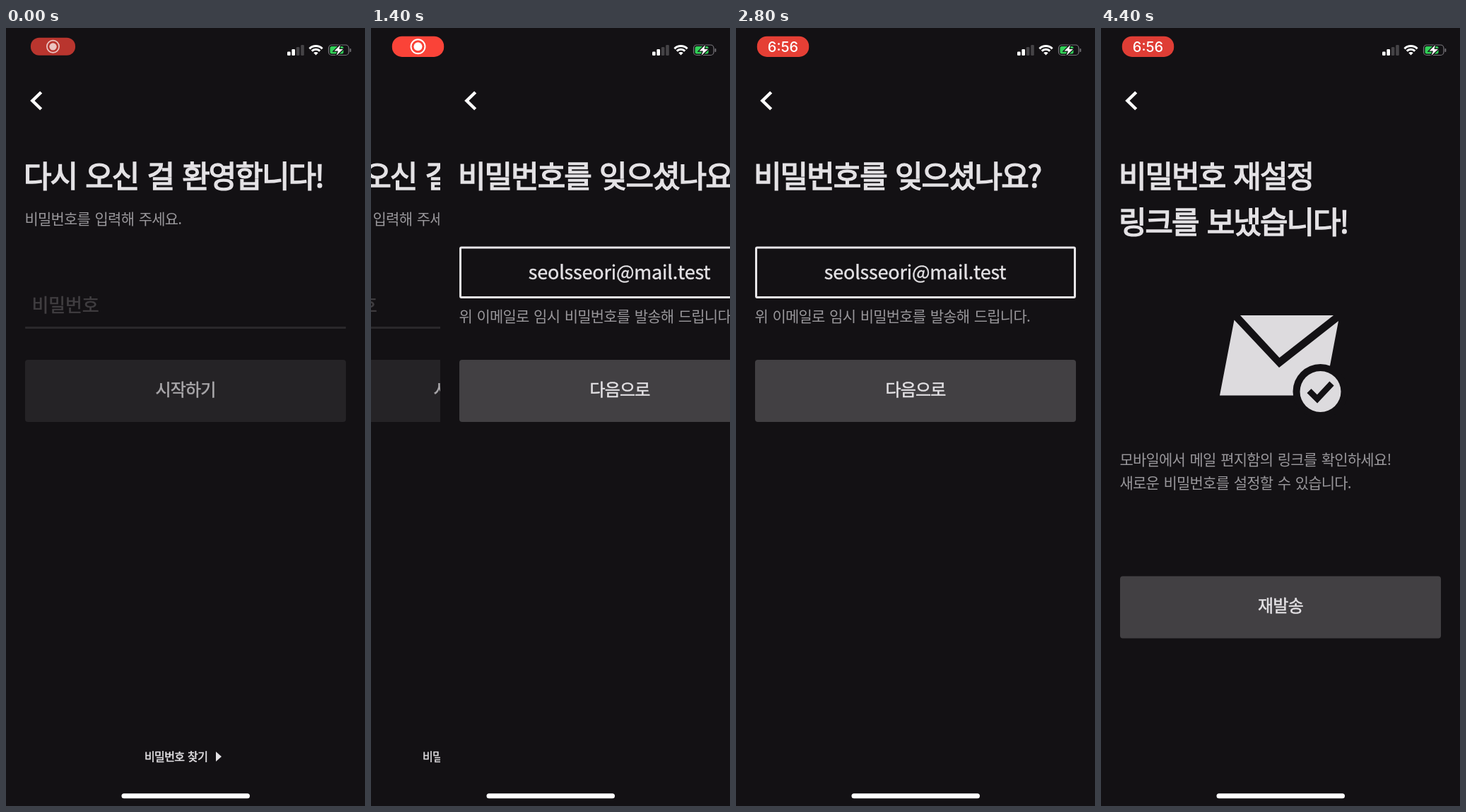
Animation, 508 px wide and 1102 px high, one loop 4.5 s. Source, as an HTML page with a canvas:

```html
<!DOCTYPE html>
<html lang="ko">
<head>
<meta charset="utf-8">
<title>비밀번호 찾기</title>
<style>
  html, body { margin: 0; width: 100%; height: 100%; overflow: hidden; background: #131114; }
  canvas { display: block; width: 508px; height: 1102px; }
</style>
</head>
<body>
<canvas id="stage"></canvas>
<script>
const W = 508, H = 1102, LOOP = 4500, TICK = 100;
const BG = '#131114', LIGHT = '#e4e2e5', MUTED = '#99979b';
const KO = '"Noto Sans CJK KR", "Noto Sans KR", "Noto Sans CJK JP", "Noto Sans CJK", sans-serif';
const UI = 'Inter, Roboto, sans-serif';

const canvas = document.getElementById('stage');
const ctx = canvas.getContext('2d');
const dpr = window.devicePixelRatio || 1;
canvas.width = W * dpr;
canvas.height = H * dpr;

const clamp = v => Math.max(0, Math.min(1, v));
const ramp = (t, from, to) => clamp((t - from) / (to - from));
const easeInOut = p => p < .5 ? 2 * p * p : 1 - 2 * (1 - p) * (1 - p);
const mix = (a, b, p) => a + (b - a) * p;

// heft thickens the regular cut to reach weights between regular and bold.
function text(str, x, y, size, opts = {}) {
  const { color = LIGHT, weight = 400, heft = 0, gap = 0, space = 0, align = 'left', font = KO } = opts;
  ctx.font = `${weight} ${size}px ${font}`;
  ctx.letterSpacing = gap + 'px';
  ctx.wordSpacing = space + 'px';
  ctx.textAlign = align;
  ctx.fillStyle = color;
  ctx.fillText(str, x, y);
  if (!heft) return;
  ctx.strokeStyle = color;
  ctx.lineWidth = heft;
  ctx.miterLimit = 2;
  ctx.strokeText(str, x, y);
  ctx.miterLimit = 10;
}

function box(x, y, w, h, r, color) {
  ctx.fillStyle = color;
  ctx.beginPath();
  ctx.roundRect(x, y, w, h, r);
  ctx.fill();
}

function disc(x, y, r, color) {
  ctx.fillStyle = color;
  ctx.beginPath();
  ctx.arc(x, y, r, 0, Math.PI * 2);
  ctx.fill();
}

function trace(points) {
  ctx.beginPath();
  points.forEach(([x, y]) => ctx.lineTo(x, y));
}

function poly(color, ...points) {
  trace(points);
  ctx.fillStyle = color;
  ctx.fill();
}

function line(color, width, ...points) {
  trace(points);
  ctx.strokeStyle = color;
  ctx.lineWidth = width;
  ctx.stroke();
}

function faded(alpha, draw) {
  ctx.save();
  ctx.globalAlpha *= alpha;
  draw();
  ctx.restore();
}

const title = (str, y) => text(str, 25, y, 43, { heft: 1.5, gap: -2, space: 4.5 });
const note = (str, y) => text(str, 26.5, y, 21, { color: MUTED, gap: -.8, space: 2.6 });

function button(label, y, fill, color, alpha = 1) {
  box(27, y, 454, 88, 4, fill);
  faded(alpha, () => text(label, 254, y + 50.5, 24, { color, heft: .5, gap: -.8, align: 'center' }));
}

// Touch feedback: quick dim on press, slower return on release.
function pressAlpha(t, down, up) {
  return t < up
    ? mix(1, .2, easeInOut(ramp(t, down, down + 150)))
    : mix(.2, 1, easeInOut(ramp(t, up, up + 250)));
}

function page(x, content) {
  ctx.save();
  ctx.translate(x, 0);
  ctx.fillStyle = BG;
  ctx.fillRect(0, 0, W, H);
  line('#fff', 4.5, [49.7, 91], [37.4, 103], [49.7, 115]);
  content();
  ctx.restore();
}

function loginPage(t) {
  title('다시 오신 걸 환영합니다!', 226);
  note('비밀번호를 입력해 주세요.', 278);
  text('비밀번호', 36.5, 402, 26, { color: '#403e41', heft: .5, gap: -.2 });
  box(27, 423, 454, 3, 1, '#2a282b');
  button('시작하기', 470, '#252326', '#aba9ac');
  faded(pressAlpha(t, 1030, 1200), () => {
    text('비밀번호 찾기', 196, 1038, 16, { heft: .5, gap: -.6, space: 1.6 });
    poly(LIGHT, [297, 1025], [305, 1032], [297, 1039]);
  });
}

function forgotPage(t) {
  title('비밀번호를 잊으셨나요?', 226);
  ctx.strokeStyle = '#e8e6e9';
  ctx.lineWidth = 3;
  ctx.beginPath();
  ctx.roundRect(28.5, 311, 451, 70.5, 1.5);
  ctx.stroke();
  text('seolsseori@mail.test', 253.5, 355.5, 27, { heft: .4, gap: -.2, align: 'center' });
  note('위 이메일로 임시 비밀번호를 발송해 드립니다.', 416);
  button('다음으로', 470, '#424043', LIGHT, pressAlpha(t, 2800, 2950));
}

function sentPage() {
  title('비밀번호 재설정', 226);
  title('링크를 보냈습니다!', 291);
  const paper = '#dddbde';
  poly(paper, [197, 407], [329, 407], [252.5, 467]);
  poly(paper, [188.5, 413.5], [252, 481], [336, 415], [316, 520.5], [168, 520.5]);
  disc(310.5, 515, 39, BG);
  disc(310.5, 515, 29, paper);
  line(BG, 8.5, [294.5, 514], [306, 525.5], [326.5, 503.5]);
  note('모바일에서 메일 편지함의 링크를 확인하세요!', 619);
  note('새로운 비밀번호를 설정할 수 있습니다.', 651.5);
  button('재발송', 776.5, '#424043', LIGHT);
}

function recordPill(t) {
  const scale = 1 - .14 * Math.exp(-t * .0053) * Math.cos(t * Math.PI / 300);
  const pulse = .93 + .07 * Math.cos((t - 1630) / 1800 * Math.PI * 2);
  const clock = ramp(t, 2500, 2800);
  ctx.save();
  ctx.translate(66.5, 26.3);
  ctx.scale(scale, scale);
  ctx.globalAlpha = mix(.71, 1, ramp(t, 0, 300));
  faded(pulse, () => box(-36.7, -14.6, 73.4, 29.2, 14, '#ff453a'));
  faded(1 - clock, () => {
    ctx.strokeStyle = '#fff';
    ctx.lineWidth = 2;
    ctx.beginPath();
    ctx.arc(0, 0, 10, 0, Math.PI * 2);
    ctx.stroke();
    disc(0, 0, 6, '#fff');
  });
  faded(clock, () => text('6:56', 0, 7.2, 20, { color: '#fff', weight: 500, align: 'center', font: UI }));
  ctx.restore();
}

function statusIcons() {
  [5.5, 9, 12, 15].forEach((h, i) =>
    box(398 + i * 6.4, 39 - h, 4.6, h, 1.2, i < 2 ? '#fff' : '#454346'));

  const up = -Math.PI / 2, spread = .78;
  [[2.3, 4.6], [8.2, 3], [12.9, 3]].forEach(([r, width]) => {
    ctx.strokeStyle = '#fff';
    ctx.lineWidth = width;
    ctx.beginPath();
    ctx.arc(438.5, 38.5, r, up - spread, up + spread);
    ctx.stroke();
  });

  ctx.strokeStyle = '#77757a';
  ctx.lineWidth = 1.2;
  ctx.beginPath();
  ctx.roundRect(456.5, 24, 28.5, 14.5, 4.5);
  ctx.stroke();
  box(486.5, 29, 1.8, 5, 1, '#77757a');
  box(458.5, 26, 19, 10.5, 2.5, '#32d158');
  const bolt = [[473, 24], [464.5, 32.5], [470, 32.5], [467.5, 39], [477, 30], [471.5, 30]];
  line(BG, 2.5, ...bolt, bolt[0]);
  poly('#fff', ...bolt);
}

function render(t) {
  ctx.setTransform(dpr, 0, 0, dpr, 0, 0);
  if (t >= 3500) {
    page(0, sentPage);
  } else {
    // Critically damped push; the page below trails at 30%.
    const u = Math.max(0, t - 1232) * .0181;
    const x = Math.round(W * (1 + u) * Math.exp(-u));
    if (x > 0) page((x - W) * .3, () => loginPage(t));
    if (x < W) page(x, () => forgotPage(t));
  }
  recordPill(t);
  statusIcons();
  box(163.5, 1084.2, 181.5, 7, 3.5, '#fff');
}

const start = performance.now();
function loop() {
  const t = (performance.now() - start) % LOOP;
  render(Math.floor(t / TICK) * TICK);
  requestAnimationFrame(loop);
}
loop();
</script>
</body>
</html>
```
